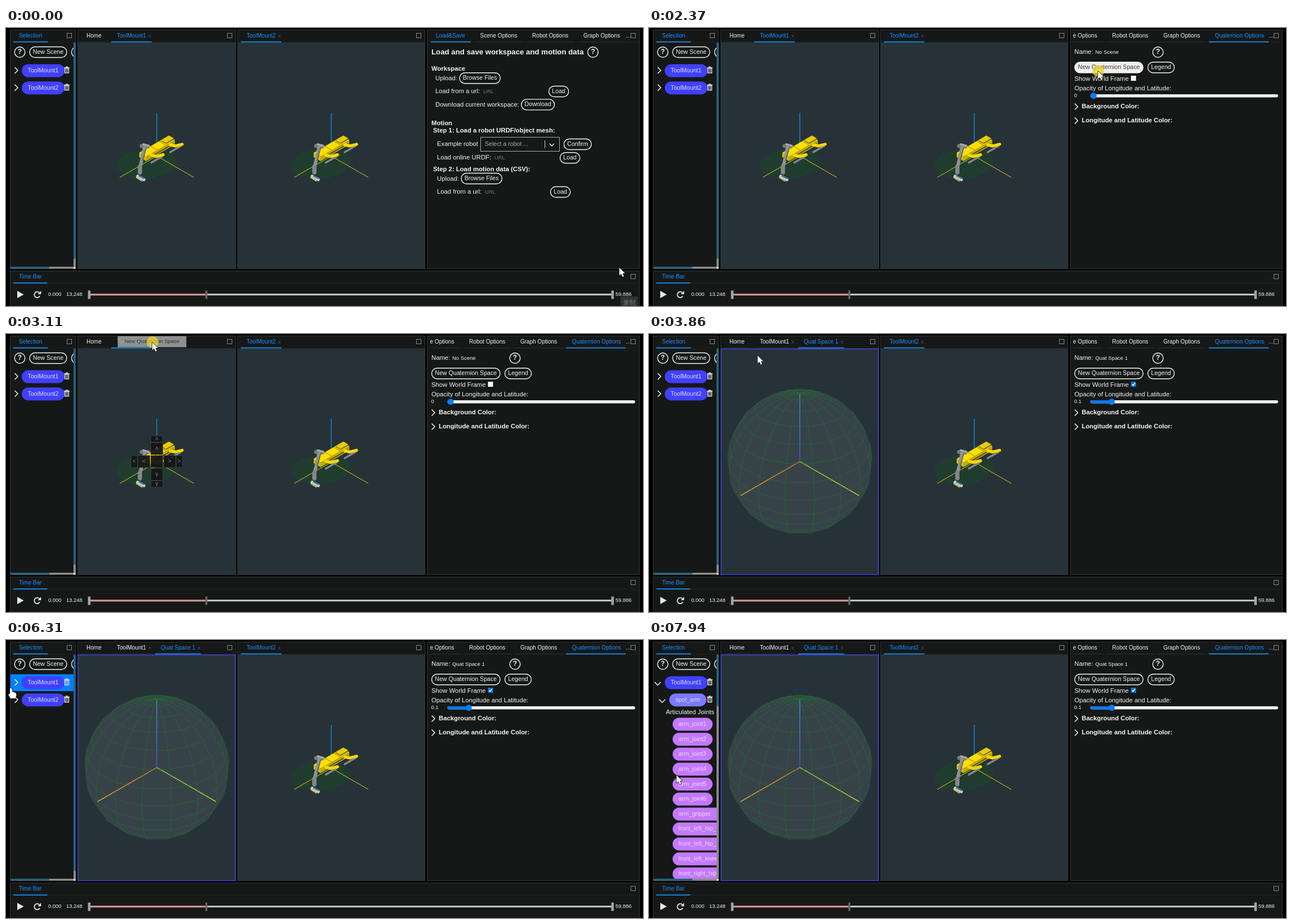
An HTML page with a canvas that plays this animation: 1132x495 px, repeating every 8 s.

```html
<!DOCTYPE html>
<html lang="en">
<head>
<meta charset="utf-8">
<title>Motion workspace</title>
<style>
html, body { margin: 0; width: 100%; height: 100%; overflow: hidden; background: #000; }
canvas { display: block; }
</style>
</head>
<body>
<canvas id="stage" width="1132" height="495"></canvas>
<script>
const g = document.getElementById('stage').getContext('2d');
const LOOP = 8000, TAU = Math.PI * 2;
const PANEL = '#161818', VIEW = '#263238', BLUE = '#1890ff', WHITE = '#f4f4f4', GREY = '#85898a';
const SLIDE = 1500, PRESS = 2370, DRAG = 2440, DROP = 3590, MADE = 3690, OPEN1 = 6600, OPEN2 = 7460;
const ARROW = new Path2D('M0 0V13.5L3.2 10.8 5.6 16 8 15 5.7 9.8H10Z');
const HAND = new Path2D('M-2 0H0L1.5 1 2 6 8 8 9.5 11 8 18H-1L-4.5 12-4 9.5-2 11Z');

// cursor moves: start, end, x, y
const HOME = [1090, 427];
const MOVES = [
  [60, 470, 1096, 26], [660, 730, 1100, 17], [970, 1130, 1090, 44], [1340, 1450, 1081, 48],
  [1600, 2100, 840, 65], [2100, 2370, 798, 77], [DRAG, 3110, 260, 15], [DROP, 4360, 70, 82],
  [4420, 4700, 373, 123], [4700, 5110, 404, 127], [5560, 6040, 5, 82], [6300, 6310, 9, 86],
  [6310, 6480, 17, 77], [6640, 6880, 21, 148], [6880, 7110, 22, 104], [7470, 7940, 49, 241]
];
function cursorAt(t) {
  let [x, y] = HOME;
  for (const [a, b, tx, ty] of MOVES) {
    const k = Math.max(0, Math.min(1, (t - a) / (b - a)));
    x += (tx - x) * k;
    y += (ty - y) * k;
  }
  return [x, y];
}

// cubic-bezier(.35, 0, .25, 1)
function ease(x) {
  if (x <= 0) return 0;
  if (x >= 1) return 1;
  let lo = 0, hi = 1, s = 0.5;
  for (let i = 0; i < 20; i++) {
    const r = 1 - s;
    if (1.05 * r * r * s + 0.75 * r * s * s + s * s * s < x) lo = s; else hi = s;
    s = (lo + hi) / 2;
  }
  return s * s * (3 - 2 * s);
}

function rect(c, x, y, w, h) { g.fillStyle = c; g.fillRect(x, y, w, h); }
function frame(c, x, y, w, h, lw = 1) { g.strokeStyle = c; g.lineWidth = lw; g.strokeRect(x, y, w, h); }
// draws text and returns its right edge
function text(s, x, y, size = 10, c = WHITE, bold = false, align = 'left') {
  g.font = (bold ? 'bold ' : '') + size + 'px "Liberation Sans", Arial, sans-serif';
  g.textAlign = align;
  g.textBaseline = 'middle';
  g.fillStyle = c;
  g.fillText(s, x, y);
  return x + g.measureText(s).width;
}
function trace(p) {
  g.beginPath();
  for (let i = 0; i < p.length; i += 2) g.lineTo(p[i], p[i + 1]);
}
function line(c, w, ...p) { trace(p); g.strokeStyle = c; g.lineWidth = w; g.stroke(); }
function poly(c, ...p) { trace(p); g.fillStyle = c; g.fill(); }
function limb(c, w, ...p) {
  g.lineCap = g.lineJoin = 'round';
  line(c, w, ...p);
  g.lineCap = 'butt';
  g.lineJoin = 'miter';
}
function disc(c, x, y, r) { g.fillStyle = c; g.beginPath(); g.arc(x, y, r, 0, TAU); g.fill(); }
function pill(x, y, w, h, fill, stroke) {
  g.beginPath();
  g.roundRect(x, y - h / 2, w, h, h / 2);
  if (fill) { g.fillStyle = fill; g.fill(); }
  if (stroke) { g.strokeStyle = stroke; g.lineWidth = 1.4; g.stroke(); }
}
function button(s, x, y, lit) {
  g.font = '10.65px "Liberation Sans", Arial, sans-serif';
  const w = g.measureText(s).width + 12.5;
  pill(x + 0.5, y, w - 1, 19, lit && '#f2efef', WHITE);
  text(s, x + w / 2, y, 10.65, lit ? '#3a3a3a' : WHITE, false, 'center');
}
function help(x, y) {
  pill(x - 9.3, y, 18.6, 18.6, null, WHITE);
  text('?', x, y, 12, WHITE, true, 'center');
}
function group(dx, area, draw) {
  g.save();
  if (area) {
    g.beginPath();
    g.rect(...area);
    g.clip();
  }
  g.translate(dx, 0);
  draw();
  g.restore();
}
function panel(x, y, w, h, fill = PANEL) {
  rect(PANEL, x, y, w, h);
  rect(fill, x, y + 23, w, h - 23);
  rect('#202323', x, y + 22, w, 1);
  frame('#353838', x + 0.5, y + 0.5, w - 1, h - 1);
  frame(GREY, x + w - 15.5, y + 6.5, 8, 8);
}
function tab(s, x, y, on, close) {
  const end = text(s, x, y + 0.4, 10.05, on ? BLUE : WHITE);
  rect(on ? '#1583d8' : '#252929', x - 10, y + 10, end - x + 20, on ? 2 : 1);
  if (close) text('x', end + 6.5, y + 0.4, 9, '#50575b', false, 'center');
  return end;
}
function chevron(x, y, down) {
  g.save();
  g.translate(x, y);
  if (down) g.rotate(Math.PI / 2);
  line(WHITE, 1.5, -2.5, -5.5, 3, 0, -2.5, 5.5);
  g.restore();
}
function trash(x, y) {
  rect('#d8d8d8', x - 5, y - 4.5, 10, 1.5);
  rect('#d8d8d8', x - 2, y - 6, 4, 1.5);
  frame('#d8d8d8', x - 3.5, y - 2.5, 7, 8, 1.4);
  for (const d of [-1.7, 0.7]) rect('#d8d8d8', x + d, y - 2, 1, 7);
}

// parallel isometric view for the robot scenes
const iso = (x, y, z) => [268 + (y - x) * 0.866, 228 + (x + y) / 2 - z];
function box([x0, x1], [y0, y1], [z0, z1], top, side, front) {
  const face = (c, ...v) => poly(c, ...v.flatMap(p => iso(...p)));
  face(top, [x0, y0, z1], [x1, y0, z1], [x1, y1, z1], [x0, y1, z1]);
  face(side, [x0, y1, z0], [x1, y1, z0], [x1, y1, z1], [x0, y1, z1]);
  face(front, [x1, y0, z0], [x1, y1, z0], [x1, y1, z1], [x1, y0, z1]);
}
function robot() {
  g.save();
  g.beginPath();
  g.ellipse(250, 241, 53, 27, -0.1, 0, TAU);
  g.clip();
  for (let y = 200; y < 306; y += 3.6) line('#14501f', 1.2, 190, y, 310, y - 36);
  g.restore();
  line('#a9a514', 1.4, ...iso(76, 0, 0), ...iso(0, 0, 0), ...iso(0, 76, 0));
  line('#1f82c8', 1.5, ...iso(0, 0, 77), ...iso(0, 0, 18));

  box([-30, 29], [-7, 7], [9, 17], '#ffe000', '#c4a804', '#d8bc00');
  box([-30, -14], [-5, 5], [17, 19], '#e8cc00', '#5e5620', '#8a7a10');
  line('#4a4420', 1.6, ...iso(-28, 7, 12), ...iso(20, 7, 12));
  for (const x of [-12, 6]) line('#8d7c10', 1, ...iso(x, -7, 17), ...iso(x, 7, 17));
  // hind then front leg
  for (const x of [0, 39]) {
    const at = (...p) => p.map((v, i) => v + x * (i % 2 ? 0.48 : -0.866));
    limb('#85868a', 3.6, ...at(311, 210, 292, 221));
    limb('#f4d800', 5.4, ...at(292, 208, 301, 210, 313, 207));
  }
  // arm and gripper
  limb('#77797c', 7, 241, 210, 252, 211);
  limb('#8f9194', 6, 246, 213, 243, 228, 239, 244);
  limb('#a5a7aa', 3.5, 244, 207, 254, 210);
  limb('#5c5e61', 1.6, 249, 214, 243, 236);
  limb('#85878a', 7.5, 238, 247, 238, 257);
  limb('#c8cac4', 5.5, 234, 264, 245, 270);
  line('#3277b8', 2.6, 236, 263, 246, 268);
  line('#d5c321', 1.5, 231, 266, 242, 273);
}

// perspective view from the (1,1,1) direction
function project(x, y, z) {
  const depth = (x + y + z) / Math.sqrt(3), f = 392 / (3.2 - depth);
  return [268 + f * (y - x) / Math.SQRT2, 227 - f * (2 * z - x - y) / Math.sqrt(6)];
}
function axis(dir, from, to) {
  const o = project(0, 0, 0), p = project(...dir), grad = g.createLinearGradient(...o, ...p);
  grad.addColorStop(0, from);
  grad.addColorStop(1, to);
  line(grad, 1.5, ...o, ...p);
}
function sphere() {
  axis([1, 0, 0], '#b8641c', '#d0981c');
  axis([0, 1, 0], '#6cb828', '#b8bc1e');
  axis([0, 0, 1], '#2850c0', '#2090dc');
  const node = (i, j) => {
    const lat = Math.PI * (0.5 - i / 16), lon = j * TAU / 20;
    return project(Math.cos(lat) * Math.cos(lon), Math.cos(lat) * Math.sin(lon), Math.sin(lat));
  };
  g.beginPath();
  for (let i = 0; i < 16; i++) for (let j = 0; j < 20; j++) {
    const q = [node(i, j), node(i + 1, j), node(i + 1, j + 1), node(i, j + 1)];
    const area = q.reduce((sum, a, k) => {
      const b = q[(k + 1) % 4];
      return sum + a[0] * b[1] - b[0] * a[1];
    }, 0);
    if (area >= 0) continue;
    q.forEach((a, k) => k ? g.lineTo(...a) : g.moveTo(...a));
    g.closePath();
  }
  g.fillStyle = 'rgba(255,255,255,.08)';
  g.fill();
  g.strokeStyle = 'rgba(35,110,52,.42)';
  g.lineWidth = 1;
  g.stroke();
}

function dockCross(cx) {
  const cell = (x, y, w, h, s) => {
    rect('rgba(20,22,22,.94)', cx + x - w / 2, 227 + y - h / 2, w, h);
    frame('#34393a', cx + x - w / 2 + 0.5, 227 + y - h / 2 + 0.5, w - 1, h - 1);
    text(s, cx + x, 227 + y, 10, '#7c8284', false, 'center');
  };
  cell(0, 0, 22, 22, '');
  for (const [d, across, along] of [[-1, '<', '˄'], [1, '>', 'v']]) {
    cell(23 * d, 0, 22, 22, across);
    cell(40 * d, 0, 12, 22, across);
    cell(0, 23 * d, 22, 22, along);
    cell(0, 40 * d, 22, 12, along);
  }
}

function selection(t, mx, my) {
  panel(7, 3, 117, 426);
  tab('Selection', 23, 13.7, true);
  const open1 = t >= OPEN1, open2 = t >= OPEN2;
  const row = (s, i, x, w, c, open) => {
    const y = 76 + 30.7 * i;
    if (!open2 && mx < 121 && Math.abs(my - y) < 15.2) rect('#0080ff', 8, y - 15, 112, 30);
    chevron(x - 10 - (open ? 2.5 : 0), y + (open ? 1.5 : -0.5), open);
    pill(x, y, w, 23, c);
    text(s, x + w / 2, y, 10.6, '#dedeee', false, 'center');
    trash(108, y - 1.5);
  };
  group(0, [8, 27, 112, 398], () => {
    help(24.5, 43);
    button('New Scene', 41.5, 43);
    pill(116.5, 43, 40, 19, null, WHITE);
    row('ToolMount1', 0, 28, 76, '#4040ff', open1);
    if (open1) row('spot_arm', 1, 36, 66, '#7a7aff', open2);
    if (!open2) return row('ToolMount2', open1 ? 2 : 1, 28, 76, '#4040ff', false);
    text('Articulated Joints', 30, 128.5, 11.3);
    const joints = [1, 2, 3, 4, 5, 6].map(n => 'arm_joint' + n).concat('arm_gripper',
      'front_left_hip_x', 'front_left_hip_y', 'front_left_knee', 'front_right_hip_x');
    joints.forEach((s, i) => {
      const y = 150 + i * 26.65;
      pill(42, y, i < 6 ? 71 : 110, 23, '#c478ff');
      text(s, 52.5, y, 10.6, '#eadcf6');
    });
  });
  const end = open2 ? 118 : 411;
  rect('#8a8c8c', 120, 26, 4, 399);
  rect('#23657c', 120, 26, 4, end - 26);
  rect('#8a8c8c', 8, 425, 113, 3.5);
  rect('#23657c', 8, 425, 69, 3.5);
  disc('#fff', 122, 427, 1.8);
}

const label = (s, x, y) => text(s, x, y, 11.3);
const head = (s, x, y, size = 11.3) => text(s, x, y, size, WHITE, true);
function uploadRow(s, action, x, y) { button(action, label(s, x, y + 0.4) + 3.5, y); }
function urlRow(s, x, y) {
  const end = label(s, x, y);
  text('URL', end + 6, y, 9.4, '#74787a');
  button('Load', end + 122, y);
}
function loadPane() {
  help(head('Load and save workspace and motion data', 756, 43, 13.28) + 16.5, 43);
  head('Workspace', 756, 72.5);
  uploadRow('Upload:', 'Browse Files', 763, 89.2);
  urlRow('Load from a url:', 763, 113);
  uploadRow('Download current workspace:', 'Download', 763, 136.4);
  head('Motion', 756, 169.5);
  head('Step 1: Load a robot URDF/object mesh:', 759, 182.5);
  label('Example robot', 766, 207);
  frame('#a8acad', 843.5, 194.5, 140, 25);
  text('Select a robot ...', 851, 206.8, 10.6, '#a9adae');
  rect('#b8bcbd', 957, 200, 1.2, 14);
  line(WHITE, 1.5, 966, 206, 970, 210, 974, 206);
  button('Confirm', 991, 207);
  urlRow('Load online URDF:', 766, 231.3);
  head('Step 2: Load motion data (CSV):', 759, 251.5);
  uploadRow('Upload:', 'Browse Files', 766, 268);
  urlRow('Load from a url:', 766, 292);
}

function quatPane(made, hover) {
  label('Name:', 756, 43.2);
  text(made ? 'Quat Space 1' : 'No Scene', 793, 43.2, 9.45);
  help(904.5, 43);
  button('New Quaternion Space', 756, 70.3, hover);
  button('Legend', 886, 70.3);
  label('Show World Frame', 756, 90.4);
  rect(made ? '#0a78f0' : '#fff', 856.5, 85, 9, 9);
  if (made) line('#fff', 1.5, 858.5, 89.5, 860.3, 91.5, 863.8, 87);
  label('Opacity of Longitude and Latitude:', 756, 107.4);
  const value = made ? 0.1 : 0, knob = 790 + 322 * value;
  text(String(value), 755.5, 120.9, 9.4);
  pill(784.5, 120.7, 333.5, 5.5, '#efefef');
  pill(784.5, 120.7, knob - 784.5, 5.5, '#0a78f0');
  disc('#0a7cff', knob, 120.7, 5.5);
  ['Background Color:', 'Longitude and Latitude Color:'].forEach((s, i) => {
    chevron(759, 140 + 25 * i);
    head(s, 769, 140.3 + 24.7 * i);
  });
}

function options(t, mx, my) {
  panel(748, 3, 378, 426);
  const p = ease((t - SLIDE) / 300), ink = ease((t - SLIDE - 23) / 300);
  const names = ['Load&Save', 'Scene Options', 'Robot Options', 'Graph Options', 'Quaternion Options'];
  group(-112 * p, [754, 4, 347, 23], () => {
    let x = 764;
    names.forEach((s, i) => {
      const end = text(s, x, 14.1, 10.05, i === (ink < 0.5 ? 0 : 4) ? BLUE : WHITE);
      rect('#252929', x - 9, 24, end - x + 19, 1);
      x = end + 26.6;
    });
    rect('#1583d8', 755 + 352 * ink, 23.7, 71 + 35 * ink, 2);
  });
  text('...', 1101, 14, 10, '#c8caca');
  const inside = [749, 27, 376, 401];
  const hover = t < DRAG && mx > 756 && mx < 879 && my > 60 && my < 80;
  if (p < 0.25) group(-1512 * p, null, () => group(0, [749 + 1512 * p, ...inside.slice(1)], loadPane));
  if (p > 0.75) group(0, inside, () => group(1512 * (1 - p), null, () => quatPane(t >= MADE, hover)));
  if (t >= 670 && t < 1380) {
    rect('#1f2222', 1000, 28, 113, 37);
    frame('#303434', 1000.5, 28.5, 112, 36);
    text('Quaternion Options', 1010, 46.5);
  }
}

function timeBar() {
  panel(7, 432, 1119, 70);
  tab('Time Bar', 23, 443, true);
  poly('#e8e8e8', 20, 468, 31.5, 474.5, 20, 481);
  g.strokeStyle = '#e8e8e8';
  g.lineWidth = 1.8;
  g.beginPath();
  g.arc(55.5, 474.8, 5.2, 0.5, TAU - 0.8);
  g.stroke();
  poly('#e8e8e8', 62.3, 468, 62.3, 474, 56.5, 474);
  const start = 0, now = 13.248, end = 59.886, mark = 148 + 930 * 0.2237;
  text(start.toFixed(3), 75, 474.7, 9.45);
  text(now.toFixed(3), 107, 474.7, 9.45);
  text(end.toFixed(3), 1083, 474.7, 9.45);
  rect('#bfc1c0', 148, 473, 930, 3.2);
  rect('#cf8d8d', 148, 473, mark - 148, 3.2);
  for (const x of [148, 1078]) rect('#a2a4a4', x - 2.4, 467.5, 4.6, 15);
  rect('#66696a', mark - 1.7, 467.5, 3.4, 15);
}

function pointer(x, y, shape) {
  g.save();
  g.translate(x, y);
  g.lineJoin = 'round';
  g.strokeStyle = '#111';
  g.lineWidth = 1.4;
  g.stroke(shape);
  g.fillStyle = '#fff';
  g.fill(shape);
  g.restore();
}

function draw(t) {
  const [mx, my] = cursorAt(t), made = t >= MADE;
  const within = (a, b) => t >= a && t < b;
  rect('#000', 0, 0, 1132, 495);
  selection(t, mx, my);

  panel(127, 3, 282, 426, VIEW);
  tab('Home', 143, 13.7, false);
  tab('ToolMount1', 197, 13.7, !made, true);
  if (made) {
    tab('Quat Space 1', 275, 13.7, true, true);
    sphere();
    frame('#4040d0', 128, 26.5, 279.5, 402, 1.6);
  } else robot();

  panel(411, 3, 334, 426, VIEW);
  tab('ToolMount2', 427.5, 13.7, true, true);
  group(310, null, robot);
  options(t, mx, my);
  timeBar();

  if (t < 130) {
    rect('#303232', 1092, 478, 31, 17);
    g.font = '11px "Noto Sans CJK SC", "Noto Sans CJK", sans-serif';
    g.textAlign = 'center';
    g.fillStyle = '#737676';
    g.fillText('录制', 1107.5, 488.5);
  }
  if (within(DRAG, DROP)) {
    dockCross(mx > 747 ? 937 : mx > 410 ? 578 : 268);
    rect('rgba(165,165,165,.85)', mx - 61.5, my - 11, 122, 19.5);
    text('New Quaternion Space', mx - 0.5, my - 1.2, 9.45, '#2c2c2c', false, 'center');
  }
  if (within(PRESS, DROP) || within(6500, 6640) || within(7380, 7500)) {
    disc('rgba(232,212,40,.78)', mx + 0.5, my - 0.5, 10.5);
  }
  const overRow = within(MADE, OPEN2) && mx < 121 && my > 61 && my < 153;
  pointer(mx, my, overRow ? HAND : ARROW);
}

const start = performance.now();
function tick(now) {
  draw(Math.max(0, now - start) % LOOP);
  requestAnimationFrame(tick);
}
draw(0);
requestAnimationFrame(tick);
</script>
</body>
</html>
```
